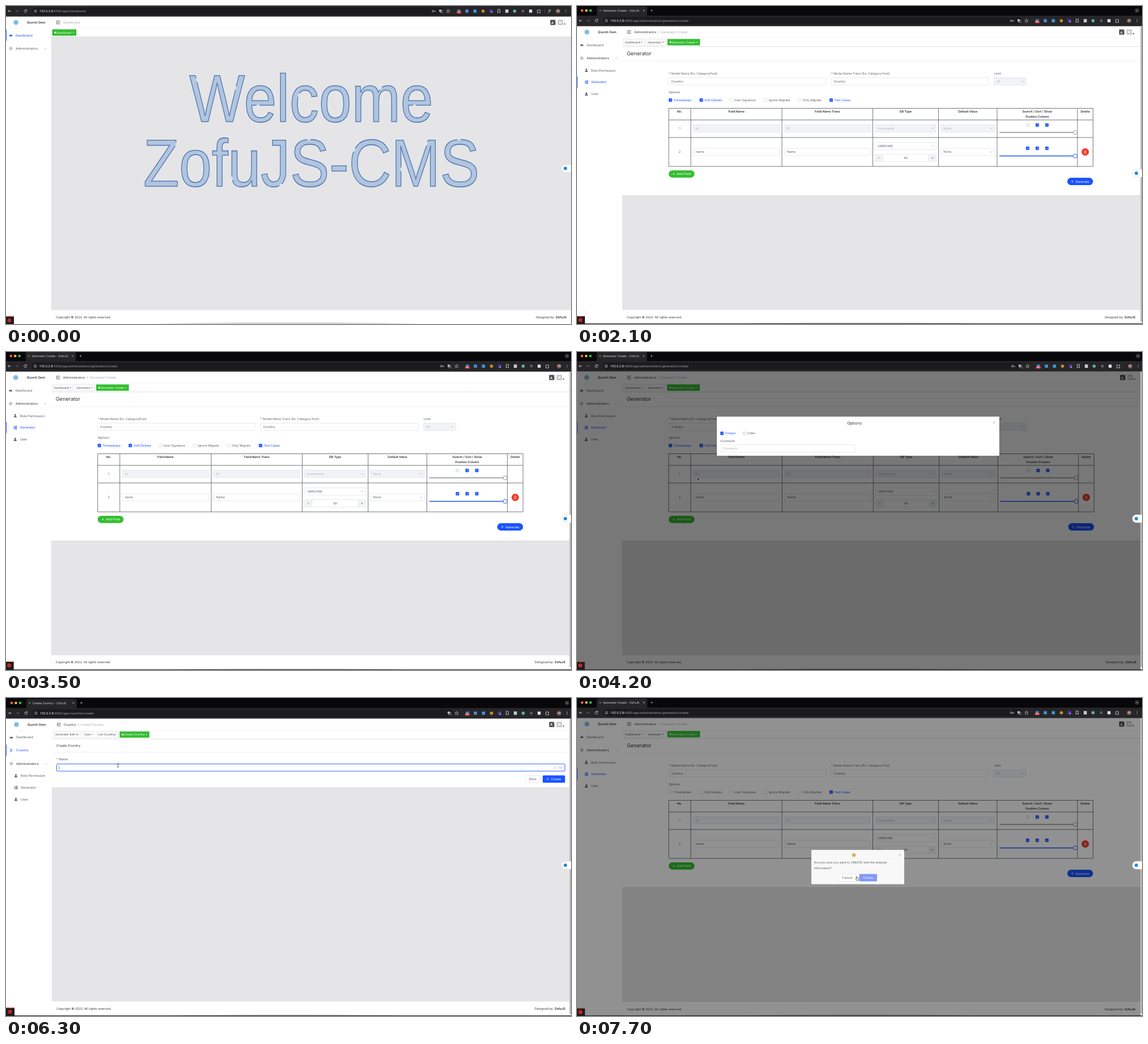
These frames come from a looping animation (998x561 px, 8000 ms). An HTML page:

```html
<!DOCTYPE html>
<html lang="en">
<head>
<meta charset="utf-8">
<title>Admin tour</title>
<style>
html, body { margin: 0; width: 100%; height: 100%; overflow: hidden; background: #fff; }
svg { display: block; width: 998px; height: 561px; }
text { font-family: Inter, "Open Sans", sans-serif; text-rendering: geometricPrecision; white-space: pre; }
.url { font-family: Roboto, "Noto Sans", sans-serif; }
.big { font: 118px "Liberation Sans", Arial, sans-serif; text-anchor: middle; }
.big text { font: inherit; vector-effect: non-scaling-stroke; }
</style>
</head>
<body>
<svg id="stage" viewBox="0 0 998 561"></svg>
<script>
const BLUE = '#1a53ff', GREEN = '#33be2f', INK = '#5c5e62', PALE = '#b0b3b9', RED = '#f0382b';
const BRAND = 'ZofuJS', HOST = '192.0.2.8';
const STEP = 700, LOOP = 8000;

// Drawing helpers; y of a text is its vertical middle.
const T = (x, y, s, size = 5.5, fill = INK, more = '') =>
  `<text x="${x}" y="${y + size * .36}" font-size="${size}" fill="${fill}" ${more}>${s}</text>`;
const R = (x, y, w, h, fill, more = '') =>
  `<rect x="${x}" y="${y}" width="${w}" height="${h}" fill="${fill}" ${more}/>`;
const C = (x, y, r, fill, more = '') => `<circle cx="${x}" cy="${y}" r="${r}" fill="${fill}" ${more}/>`;
const L = (d, color, w = .8) => `<path d="${d}" fill="none" stroke="${color}" stroke-width="${w}"/>`;
const G = (transform, body) => `<g transform="${transform}">${body}</g>`;
const MID = 'text-anchor="middle"', END = 'text-anchor="end"', BOLD = 'font-weight="600"';
const chevron = (x, y, up, color = '#999') =>
  L(up ? `M${x - 1.6} ${y + .8}l1.6-1.6 1.6 1.6` : `M${x - 1.6} ${y - .8}l1.6 1.6 1.6-1.6`, color, .7);
const cross = (x, y, r, color) => L(`M${x - r} ${y - r}l${2 * r} ${2 * r}M${x + r} ${y - r}l${-2 * r} ${2 * r}`, color, .6);
const plus = (x, y, color) => L(`M${x - 1.8} ${y}h3.6M${x} ${y - 1.8}v3.6`, color, .6);

function field(x1, x2, y, text, on = true, select = false) {
  return R(x1, y - 6.4, x2 - x1, 12.8, on ? '#fff' : '#f1f3f7', 'rx="1" stroke="#d8dbe2" stroke-width=".6"') +
    T(x1 + 4.5, y, text, 5.5, on ? INK : PALE) + (select ? chevron(x2 - 6, y) : '');
}
function check(x, y, on, label = '', off = false) {
  return R(x - 2.7, y - 2.7, 5.4, 5.4, on ? BLUE : off ? '#edf0f5' : '#fff',
      `rx=".7" stroke="${on ? BLUE : '#d0d3da'}" stroke-width=".6"`) +
    (on ? L(`M${x - 1.4} ${y}l1.1 1.1 1.8-2.1`, '#fff', .7) : '') +
    T(x + 5.6, y, label, 5.45, on ? BLUE : INK);
}
function button(x1, x2, y, label, fill, color = '#fff', rx = 1.5, icon = false) {
  const border = fill === '#fff' ? 'stroke="#d8dbe2" stroke-width=".6"' : '';
  return R(x1, y - 6.4, x2 - x1, 12.8, fill, `rx="${rx}" ${border}`) +
    (icon ? plus(x1 + 9, y, color) : '') +
    T((x1 + x2) / 2 + (icon ? 4 : 0), y, label, 5.6, color, MID);
}
const arrow = (x, y, k) => G(`translate(${x} ${y}) scale(${k})`,
  '<path d="M0 0V30L7 24L11.5 35L17 32.5L12.5 22H21Z" stroke="#fff" stroke-width="1.6"/>');
const pageTop = h => h - 10.4;

function browser({ h, dx, ex = 0, ax = 0, key = true, badge = '99+', title, path }) {
  const y = h - 20, ty = h - 38, w = '#dcdcdc';
  let s = R(0, 0, 998, pageTop(h), '#262628') + R(0, 0, 998, h - 29, '#08080a');
  s += ['#ff5f57', '#febc2e', '#28c840'].map((c, i) => C(9 + dx + i * 7.5, ty, 2.3, c)).join('');
  s += R(35 + dx, ty - 7, 89, 17, '#262628', 'rx="3"') + C(41 + dx, ty, 1.5, '#66727d') +
    T(46 + dx, ty, `${title} - ${BRAND}`, 5.1, '#e2e2e2') + cross(118 + dx, ty, 1.3, w) + plus(132 + dx, ty, w) +
    C(991 + ax, ty, 4, '#303033') + chevron(991 + ax, ty, false, w);
  s += R(46 + dx, y - 6.5, 742 + ex, 13, '#1b1b1d', 'rx="6.5"');
  s += L(`M${9 + dx} ${y}h-5m2-2l-2 2 2 2`, w) + L(`M${17 + dx} ${y}h5m-2-2l2 2-2 2`, '#68686b') +
    L(`M${36.5 + dx} ${y - 1}a2.3 2.3 0 1 0 .2 1.6m-.2-3.6v2h-2`, w);
  s += C(52 + dx, y, 2.3, 'none', `stroke="${w}" stroke-width=".6"`) + R(51.7 + dx, y - 1.2, .6, 2.6, w);
  s += T(59 + dx, y, `${HOST}<tspan fill="#9b9b9d">:4500/app/${path}</tspan>`, 5.75, '#f2f2f2', 'class="url"');
  if (key) s += C(769 + ex, y, 1.5, 'none', `stroke="${w}" stroke-width=".7"`) + L(`M${770.5 + ex} ${y}h3v1.5`, w);
  s += R(780 + ex, y - 2.8, 4, 4, '#aaa') + R(782 + ex, y - 1, 4, 4, 'none', `stroke="${w}" stroke-width=".6"`);
  s += G(`translate(${796 + ex} ${y})`, L('M0-3L.9-1 3-.8 1.4.6 1.9 2.7 0 1.6-1.9 2.7-1.4.6-3-.8-.9-1Z', w, .6));
  ['#2f8fd8', '#4b8bdc', '#3f96dc', '#d08a30', '#5335b4'].forEach((c, i) => {
    const x = 815 + ex + i * 14.2;
    s += i === 3 ? C(x, y, 2.8, c) : R(x - 2.8, y - 2.8, 5.6, 5.6, c, 'rx=".7"');
  });
  s += R(811 + ex, y + .3, 8, 4, '#e83939', 'rx=".8"') + T(815 + ex, y + 2.3, badge, 3.2, '#fff', MID + BOLD) +
    T(873 + ex, y + 1.6, '3', 4, '#fff', MID + BOLD);
  s += L(`M${883.5 + ex} ${y - 3}h4v6l-2-1.6-2 1.6z`, w);
  s += R(897 + ex, y - 3, 5.5, 6, '#c8c8c8') + C(913.5 + ex, y, 2.8, '#5bb794') +
    C(928 + ex, y, 2.4, '#626264') + R(939 + ex, y - 2.7, 5.4, 5.4, '#e0e0e0') +
    L(`M${953.5 + ex} ${y - 2}h5v5h-5z`, w);
  if (ex < -9) s += R(951, y - 3, .7, 6, '#555') + L(`M958 ${y - 2}h5m-5 2h4m-4 2h2`, w);
  return s + C(977 + ax, y, 3.8, '#82615a') + T(977 + ax, y, 'M', 4, '#fff', MID) +
    [-2, 0, 2].map(d => C(991 + ax, y + d, .6, w)).join('');
}

function sidebar({ h, dx, active, country, open = true }) {
  const w = 80 + dx, top = h + 22.5;
  let s = R(0, pageTop(h), w, 600, '#fff') + C(17.5 + dx, h, 4.3, '#80bce0') +
    T(37 + dx, h, 'Quonh Dem', 5.8, '#222', 'font-weight="500"');
  const item = (name, y, sub = 0) => {
    const on = name === active, c = on ? BLUE : INK, x = 8.5 + dx + sub;
    if (on) s += R(0, y - 10, .9, 20, BLUE);
    if (name === 'Dashboard') s += `<path d="M${x - 2.8} ${y + 2}a2.8 3 0 1 1 5.6 0z" fill="${c}"/>`;
    else if (name === 'Administrators') s += C(x, y, 2.3, 'none', `stroke="${c}" stroke-width=".9" stroke-dasharray="1.4 .4"`) + C(x, y, .8, c);
    else if (name === 'Country') s += L(`M${x - 2.5} ${y - 2}h3.5m-3.5 2h5m-5 2h4`, c);
    else if (name === 'Generator') s += L(`M${x - 2} ${y - 3}v5.3h2.2m-2.2-2.6h2.2`, c) +
      [-2.2, 0, 2.2].map(d => R(x, y + d - .7, 3, 1.4, c)).join('');
    else s += C(x, y - 1.4, 1.5, c) + `<path d="M${x - 2.6} ${y + 2.8}a2.6 2.6 0 0 1 5.2 0z" fill="${c}"/>`;
    s += T(17 + dx + sub, y, name, 5.75, name === 'Administrators' && open ? '#333' : c);
  };
  item('Dashboard', top);
  let y = top + 23.5;
  if (country) { item('Country', y - .5); y += 23; }
  item('Administrators', y);
  s += chevron(69.5 + dx, y, open);
  if (open) ['Role Permission', 'Generator', 'User'].forEach((n, i) => item(n, y + 21.5 + i * 20.8, 8));
  return s;
}

function header({ h, dx, ax = 0, ra = ax, crumbs, tabs }) {
  const x = 92 + dx;
  let s = R(80 + dx, pageTop(h), 918, 35.7, '#fff') + R(80 + dx, h + 10.3, 918, .5, '#ececec') +
    R(80 + dx, h + 25, 918, .8, '#d9dade');
  s += L(`M${x - 3} ${h - 2.5}h6.5m-4 2.5h4m-6.5 2.5h6.5`, '#444') + `<path d="M${x - 3} ${h - 1.4}l2 1.4-2 1.4z" fill="#444"/>`;
  s += crumbs[1]
    ? T(101 + dx, h, `${crumbs[0]}<tspan fill="#777">  /  </tspan><tspan fill="#a8aab0">${crumbs[1]}</tspan>`, 5.7, '#3a3b3e')
    : T(101 + dx, h, crumbs[0], 5.8, '#a8aab0');
  s += R(959.5 + ra, h - 4.5, 9, 9, '#424246', 'rx=".8"') + T(963.4 + ra, h + .2, 'A', 6.5, '#fff', MID + BOLD) +
    C(967 + ra, h - 2.4, .7, '#fff');
  s += R(972.5 + ra, h - 4.7, 9.4, 9.4, '#c6c7ca', 'rx="1"') + R(975 + ra, h - 2, 4.5, 4, '#eee') +
    `<path d="M${983 + ra} ${h + 2}h3.4l-1.7 2z" fill="#333"/>`;
  tabs.forEach(([x1, x2, name], i) => {
    const on = i === tabs.length - 1, y = h + 17.8, c = on ? '#fff' : '#444', a = x1 + dx, b = x2 + dx;
    s += R(a, y - 5.3, b - a, 10.6, on ? GREEN : '#fff', `stroke="${on ? GREEN : '#d4d7de'}" stroke-width=".6"`) +
      (on ? C(a + 5, y, 1.6, '#fff') : '') + T(a + (on ? 7.2 : 3), y, name, 5.1, c) + cross(b - 5, y, 1, c);
  });
  return s;
}

const footer = ({ dx, ax = 0, ra = ax, fy }) => R(80 + dx, fy - 12.6, 918, 30, '#fff') +
  T(88 + dx, fy, 'Copyright © 2022. All rights reserved.', 5.4, '#333') +
  T(988 + ra, fy, `Designed by: <tspan font-weight="700">${BRAND}</tspan>`, 5.4, '#333', END) +
  '<ellipse cx="497" cy="562" rx="270" ry="4.5" fill="url(#dock)"/>';

// Page, dimming layer, browser frame and dialog; the page scrollbar is never dimmed.
function screen(o, body, shade = 0, modal = '') {
  const top = pageTop(o.h), corner = Math.min(o.dx, 2);
  return '<defs><radialGradient id="dock"><stop stop-color="#888" stop-opacity=".5"/><stop offset=".85" stop-color="#999" stop-opacity=".32"/><stop offset="1" stop-color="#fff" stop-opacity="0"/></radialGradient></defs>' +
    R(0, 0, 998, 561, '#e5e5e7') + body + header(o) + sidebar(o) + footer(o) +
    (shade ? R(0, top, 998, 600, '#000', `opacity="${shade}"`) : '') +
    (o.bare ? '' : R(995.3, top, 2.7, 600, '#f4f4f4') + R(995.8, top + 1, 1.7, 520, '#9a9a9c')) +
    browser(o) + modal +
    R(981, o.pill - 7, 24, 14, '#fff', 'rx="7" stroke="#d5d5d5" stroke-width=".6"') + C(988, o.pill, 3, '#2188e8') +
    R(0, o.fy - 1.5, 14 + corner, 20, '#1c1c20') + R(0, o.fy - 1.5, 14 + corner, .9, RED) + C(6 + corner, o.fy + 5.5, 3.6, '#b82b25') +
    (o.bare ? '' : R(0, 560, 998, 1, '#1a1a1c'));
}

function dashboard(step) {
  const lines = [['Welcome', 203.6], [BRAND + '-CMS', 317.8]];
  const words = attrs => lines.map(([s, y]) => G(`translate(539.3 ${y}) scale(.879 1)`, `<text ${attrs}>${s}</text>`)).join('');
  const body = '<g class="big">' + words('fill="#b1c5e0" stroke="#dce4ec" stroke-width="1.7"') +
    words(`fill="none" stroke="#5178b0" stroke-width="1.6" stroke-dasharray="270 6" stroke-dashoffset="${step * 40}"`) + '</g>';
  return screen({
    h: 29, dx: 0, ex: -15, ax: -2, ra: 2, fy: 549, pill: 286.5, bare: true, badge: '53',
    title: 'Dashboard', path: 'homeboard', active: 'Dashboard', open: false,
    crumbs: ['Dashboard'], tabs: [[82, 124, 'Dashboard']]
  }, body);
}

function country() {
  const body = R(80, 71, 918, 87, '#fff') + R(80, 158, 918, .7, '#d6d6da') +
    T(89, 83.5, 'Create Country', 5.9, '#333') + R(81, 95.3, 915, .5, '#dfe0e4') +
    T(89, 108, `<tspan fill="${RED}">*</tspan> Name`, 5.7) +
    R(89.5, 116.3, 897.7, 12.7, '#fff', `rx="1" stroke="${BLUE}" stroke-width=".9"`) + R(93.5, 119.5, .6, 6.5, '#333') +
    T(983, 123, '0 / 191', 5, '#9b9da3', END) +
    button(918, 943, 143, 'Back', '#fff', INK) + button(948, 987.5, 143, 'Create', BLUE, '#fff', 1.5, true);
  return screen({
    h: 46.7, dx: 1, key: false, fy: 548, pill: 295, title: 'Create Country', path: 'countries/create',
    active: 'Country', country: true, crumbs: ['Country', 'Create Country'],
    tabs: [[83, 131, 'Generator Edit-1'], [134, 155.5, 'User'], [159, 197, 'List Country'], [200, 252, 'Create Country']]
  }, body, 0, L('M196.6 115.7q1.2 0 1.2 1v4.6q0 1-1.2 1m2.4-6.6q-1.2 0-1.2 1m0 4.6q0 1 1.2 1', '#111', .7));
}

function form(cols, rows, checked) {
  const bottom = rows > 1 ? 283 : 232, mid = i => (cols[i] + cols[i + 1]) / 2;
  const span = (i, y, text, on, sel) => field(cols[i] + 4.3, cols[i + 1] - 4.3, y, text, on, sel);
  const slider = (y, c) => R(cols[5] + 4, y - .8, cols[6] - cols[5] - 8, 1.6, c, 'rx=".8"') +
    C(cols[6] - 4, y, 3.6, '#fff', `stroke="${c}" stroke-width=".9"`);
  let s = R(60, 70, 960, bottom - 19, '#fff') + R(60, bottom + 51, 960, .8, '#d6d6da') +
    T(88, 84, 'Generator', 9.2, '#333') + R(60, 97.5, 960, .5, '#e3e4e7');
  [['* Model Name (Ex: CategoryPost)', 162], ['* Model Name Trans (Ex: Category Post)', 449], ['Limit', 736.5]]
    .forEach(([n, x]) => s += T(x, 119, n.replace('*', `<tspan fill="${RED}">*</tspan>`), 5.4));
  s += field(162, 439.5, 133, 'Country') + field(449, 727, 133, 'Country') + field(736.5, 793, 133, '25', false, true);
  s += T(162, 152, 'Options', 5.5);
  [['Timestamps', 165], ['Soft Deletes', 219.5], ['User Signature', 272], ['Ignore Migrate', 333], ['Only Migrate', 393], ['Test Cases', 449]]
    .forEach(([n, x], i) => s += check(x, 166, checked.includes(i), n));
  const rules = rows > 1 ? [180.5, 201, 232, 283] : [180.5, 201, 232];
  s += L(rules.map(y => `M${cols[0]} ${y}H${cols[7]}`).join('') +
    cols.map(x => `M${x} 180.5V${bottom}`).join(''), '#66686c', .9);
  ['No.', 'Field Name', 'Field Name Trans', 'DB Type', 'Default Value', 'Search / Sort / Show', 'Delete']
    .forEach((n, i) => s += T(mid(i), 186, n, 5.3, '#2c2d30', MID + BOLD));
  s += T(mid(5), 195, 'Position Column', 5.3, '#2c2d30', MID + BOLD);
  s += T(mid(0), 216, '1', 5.5, INK, MID) + span(1, 216, 'id', false) + span(2, 216, 'ID', false) +
    span(3, 216, 'Increments', false, true) + span(4, 216, 'None', false, true) +
    [-17, 0, 17].map(d => check(mid(5) + d, 210, d >= 0, '', true)).join('') + slider(223, '#8c8e92');
  if (rows > 1) {
    const a = cols[3] + 4.3, b = cols[4] - 4.3;
    s += T(mid(0), 257.5, '2', 5.5, INK, MID) + span(1, 257.5, 'name') + span(2, 257.5, 'Name') +
      span(3, 247, 'VARCHAR', true, true) + field(a, b, 268, '') + R(a, 261.8, 13, 12.4, '#f1f3f7') + R(b - 13, 261.8, 13, 12.4, '#f1f3f7') +
      L(`M${a + 13} 262v12M${b - 13} 262v12`, '#d8dbe2', .6) + L(`M${a + 4.5} 268h4`, '#777', .6) + plus(b - 6.5, 268, '#777') +
      T(mid(3), 268, '191', 5.3, INK, MID) + span(4, 257.5, 'None', true, true) +
      [-17, 0, 17].map(d => check(mid(5) + d, 251, true)).join('') + slider(264.5, BLUE) +
      C(mid(6), 257.5, 6.5, RED) + L(`M${mid(6) - 2} 256h4m-3.5 0v4h3v-4m-2.2-1.2h1.4`, '#fff', .6);
  }
  return s + button(162, 207.5, bottom + 13.3, 'Add Field', GREEN, '#fff', 6.4, true) +
    button(866, 911.5, bottom + 26.5, 'Generate', BLUE, '#fff', 6.4, true);
}

const WIDE = [162, 201, 362, 522.5, 638.5, 742, 884, 911.5];
const SHORT = [162, 204, 375.5, 547, 621, 731, 883.5, 911];
const generator = place => ({
  title: 'Generator Create', path: 'administrators/generators/create', active: 'Generator',
  crumbs: ['Administrators', 'Generator Create'],
  tabs: [[82, 119, 'Dashboard'], [122, 157, 'Generator'], [160, 217, 'Generator Create']], ...place
});
const LOWER = generator({ h: 46, dx: 0, ex: -2, ax: -1.8, fy: 548.7, pill: 295 });
const UPPER = generator({ h: 45, dx: -.3, fy: 547.5, pill: 294 });
const RAISED = generator({ h: 34.7, dx: 3, fy: 550, pill: 290 });
const upperForm = () => G('translate(-.5 -1) scale(1.0025 1)', form(WIDE, 2, [0, 1, 5]));

const filled = () => screen(LOWER, form(WIDE, 2, [0, 1, 5]));
const ready = () => screen(UPPER, upperForm());

function confirmBox() {
  const box = '<g opacity=".94">' + R(414, 268, 164, 60.5, '#fff', 'rx="1"') + '</g>' +
    C(489, 277, 3.1, '#d6a32c') + R(488.6, 275.2, .8, 2.3, '#fff') + R(488.6, 278.1, .8, .8, '#fff') + cross(570, 277, 1.7, '#999') +
    T(418.5, 290.5, 'Are you sure you want to CREATE with the entered', 5.4) + T(418.5, 300.5, 'information?', 5.4) +
    button(462, 493, 317, 'Cancel', '#fff', INK) + button(498.5, 530, 317, 'Create', '#8298f8') +
    '<path d="M493.3 315.5q.8-.6 1.2.2l.4 1.6 2 .5q.7.3.5 1.2l-.6 2.6h-2.6l-1.8-2.4q0-1 1-.4z" fill="#fff" stroke="#222" stroke-width=".7"/>';
  return screen(LOWER, form(WIDE, 2, [5]), .43, box);
}

function options() {
  const box = R(247, 114, 499, 69, '#fff', 'rx="1"') + T(490, 125.5, 'Options', 7, '#333', MID) + cross(736.7, 124.5, 1.8, '#888') +
    check(256, 143.5, true, 'Unique') + check(295.5, 143.5, false, 'Index', true) +
    T(253, 157, 'Comment', 5.6) + field(253, 492, 170, '') + T(257.5, 170, 'Comment', 5.5, PALE) + arrow(213, 221.5, .17);
  return screen(UPPER, upperForm(), .53, box);
}

function blank() {
  const tip = R(326, 133, 62, 12.3, '#fff', 'rx="1" stroke="#e4e5e8" stroke-width=".6"') +
    T(357, 139.2, 'Not run artisan migrate', 4.9, '#8a8c90', MID);
  return screen(RAISED, G('translate(3 -13.2) scale(1 1.027)', form(SHORT, 1, [0, 1, 5])), 0, tip + arrow(515, 136, 1));
}

const tour = [dashboard, dashboard, country, filled, confirmBox, ready, options, blank, dashboard, country, filled, confirmBox];
const stage = document.getElementById('stage');
let shown = -1;
function tick() {
  const step = Math.floor(performance.now() % LOOP / STEP);
  if (step !== shown) stage.innerHTML = tour[shown = step](step);
  requestAnimationFrame(tick);
}
tick();
</script>
</body>
</html>
```
